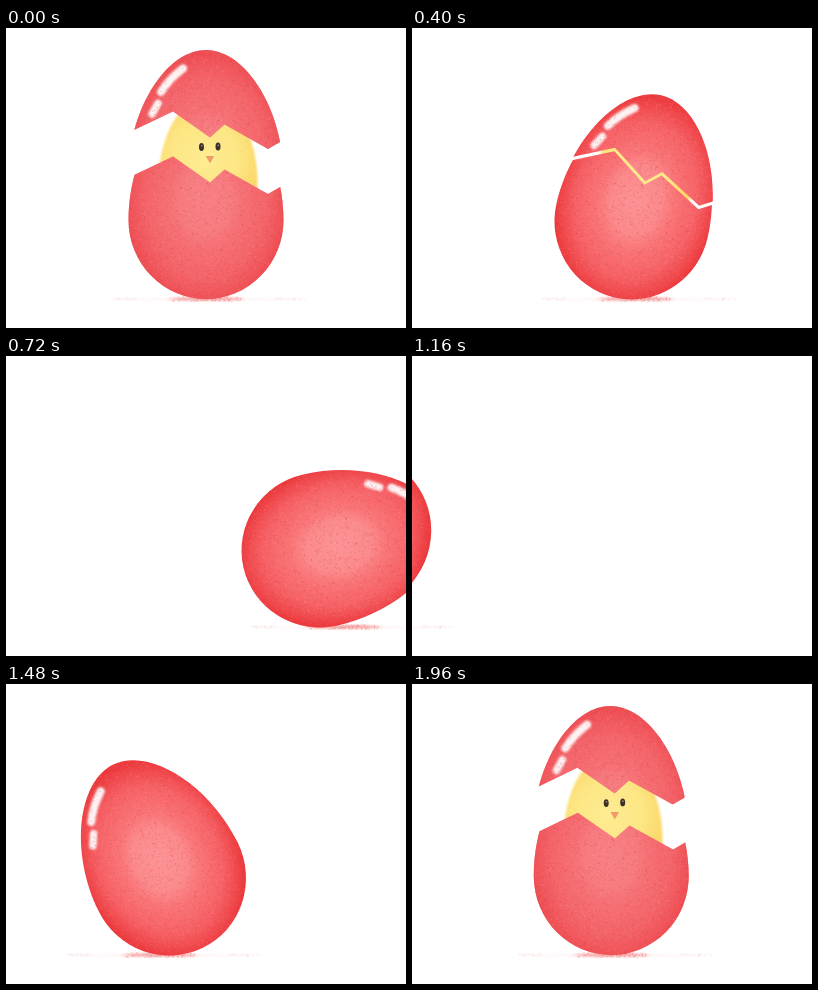
An HTML page that plays this animation: 400 by 300 pixels, repeating every 2 s.

```html
<!DOCTYPE html>
<html lang="en">
<head>
<meta charset="utf-8">
<title>Rolling egg</title>
<style>
  html, body { margin: 0; width: 100%; height: 100%; overflow: hidden; background: #fff; }
  svg { display: block; width: 100%; height: 100%; }
</style>
</head>
<body>
<svg viewBox="0 0 400 300">
  <defs>
    <radialGradient id="red" gradientUnits="userSpaceOnUse" cx="0" cy="0" r="80"
      gradientTransform="translate(200 173) scale(1 1.28)">
      <stop offset="0" stop-color="#fc9395"/>
      <stop offset=".32" stop-color="#fb8a8c"/>
      <stop offset=".46" stop-color="#f97679"/>
      <stop offset=".74" stop-color="#f66266"/>
      <stop offset=".9" stop-color="#f04a4e"/>
      <stop offset="1" stop-color="#eb393c"/>
    </radialGradient>
    <radialGradient id="yellow" gradientUnits="userSpaceOnUse" cx="198" cy="130" r="58">
      <stop offset="0" stop-color="#feec92"/>
      <stop offset=".6" stop-color="#fde684"/>
      <stop offset="1" stop-color="#fbd768"/>
    </radialGradient>
    <filter id="soft" x="-20%" y="-20%" width="140%" height="140%"><feGaussianBlur stdDeviation="1"/></filter>
    <filter id="haze" x="-20%" y="-100%" width="140%" height="300%"><feGaussianBlur stdDeviation="2 1"/></filter>
    <clipPath id="outline">
      <path id="egg" d="M122.500 192C122.500 127 160 67 200 67S277.500 127 277.500 192A77.500 79 0 0 1 122.500 192Z"/>
    </clipPath>
    <clipPath id="upper"><polygon id="upperCut"/></clipPath>
    <clipPath id="lower"><polygon id="lowerCut"/></clipPath>
    <g id="shell">
      <use href="#egg" fill="url(#red)"/>
      <use id="tint" href="#egg" fill="#f0686f"/>
      <g fill="none" stroke="#fff" stroke-linecap="round" opacity=".93" filter="url(#soft)">
        <path d="M155 109Q163 96 177 85.500" stroke-width="8"/>
        <path d="M146 131L152 120.500" stroke-width="7.500"/>
      </g>
      <g clip-path="url(#outline)" fill="none">
        <path id="dark" stroke="#d3303a" stroke-width=".9" opacity=".3"/>
        <path id="light" stroke="#ffb4b4" stroke-width=".9" opacity=".22"/>
      </g>
    </g>
  </defs>
  <g id="shadow" fill="none">
    <ellipse cx="203" cy="271.500" rx="95" ry="1.200" fill="#fef4f4" filter="url(#haze)"/>
    <ellipse cx="200" cy="271" rx="38" ry="2" fill="#f9bcbc" filter="url(#haze)"/>
    <path id="dust" stroke="#f07a7c" stroke-width="1" opacity=".45"/>
    <path id="farDust" stroke="#f9cfcf" stroke-width="1" opacity=".35"/>
  </g>
  <g id="body">
    <g id="chick">
      <ellipse cx="202" cy="155" rx="49.500" ry="86" fill="url(#yellow)" filter="url(#soft)"/>
      <path id="down" fill="none" stroke="#f3c85a" stroke-width=".9" opacity=".3"/>
      <g fill="#3b312b">
        <ellipse cx="195.500" cy="119" rx="2.500" ry="3.900"/>
        <ellipse cx="212" cy="118.500" rx="2.500" ry="3.900"/>
      </g>
      <g fill="#97836a">
        <circle cx="195.800" cy="117.800" r=".9"/>
        <circle cx="212.300" cy="117.300" r=".9"/>
      </g>
      <path d="M200.500 128.500H207.500L204 134.500Z" fill="#f39a6b" stroke="#f39a6b" stroke-linejoin="round"/>
    </g>
    <use id="bottom" href="#shell"/>
    <use id="top" href="#shell" clip-path="url(#upper)"/>
  </g>
</svg>
<script>
const LOOP = 2000, STEP = 40, GAP = 45;
const $ = id => document.getElementById(id);

let seed = 11;
const rand = () => (seed = seed * 16807 % 2147483647) / 2147483647;
const around = () => rand() + rand() - 1;

// Fill a path with short grain marks
function grain(id, count, place) {
  let d = '';
  for (let i = 0; i < count; i++) {
    const [x, y] = place();
    d += `M${x.toFixed(1)} ${y.toFixed(1)}h${(0.5 + rand()).toFixed(1)}`;
  }
  $(id).setAttribute('d', d);
}
const onEgg = () => [120 + rand() * 160, 64 + rand() * 208];
grain('dark', 2200, onEgg);
grain('light', 2000, onEgg);
grain('down', 260, () => {
  const a = rand() * Math.PI * 2, r = 0.75 + rand() * 0.25;
  return [202 + 49 * r * Math.cos(a), 155 + 85 * r * Math.sin(a)];
});
grain('dust', 170, () => [200 + around() * 42, 271 + around() * 3]);
grain('farDust', 90, () => [rand() < 0.5 ? 107 + rand() * 24 : 268 + rand() * 32, 271 + around() * 2]);

const crack = '112,155 128,147 167,128.5 204,154.5 218.5,141.5 262,166 275,158.5 292,149';
$('upperCut').setAttribute('points', crack + ' 292,40 112,40');
$('lowerCut').setAttribute('points', crack + ' 292,290 112,290');

// Shell opening: pulls back before shutting, then eases open
function gapAt(t) {
  if (t < 407) {
    const p = t / 407;
    return GAP * (1 - p * p * (2.70158 * p - 1.70158));
  }
  if (t > 1637) {
    const p = Math.min(1, (t - 1637) / 323);
    return GAP * (1 - (1 - p) ** 3);
  }
  return 0;
}

// Roll distance: leaves to the right, returns from the left
function rollAt(t) {
  const s = Math.min(t, LOOP - t);
  return (t < LOOP / 2 ? 1 : -1) * 3.33 * (Math.exp(0.0052 * s) - 1);
}

function draw(t) {
  const roll = rollAt(t), gap = gapAt(t);
  const angle = roll / 102, turn = Math.abs(angle);

  // The wide end trails the roll and lifts once the tip passes below
  const lag = 23 * Math.abs(Math.sin(1.2 * turn)) ** 1.5;
  const over = Math.max(0, turn - Math.PI / 2);
  const x = roll - Math.sign(angle) * lag;
  const y = 2 * Math.abs(Math.sin(turn)) - 18 * Math.min(1.5, over) ** 1.3;

  $('shadow').setAttribute('transform', `translate(${roll} 0)`);
  $('body').setAttribute('transform',
    `translate(${x} ${y}) rotate(${angle * 180 / Math.PI} 200 192)`);
  $('top').setAttribute('transform', `translate(0 ${-gap})`);
  $('tint').setAttribute('opacity', 0.45 * Math.min(1, gap / GAP));

  const open = gap > 0;
  $('chick').style.display = $('top').style.display = open ? '' : 'none';
  if (open) $('bottom').setAttribute('clip-path', 'url(#lower)');
  else $('bottom').removeAttribute('clip-path');
}

const start = performance.now();
function tick() {
  const t = (performance.now() - start) % LOOP;
  draw(Math.floor(t / STEP) * STEP);
  requestAnimationFrame(tick);
}
tick();
</script>
</body>
</html>
```
